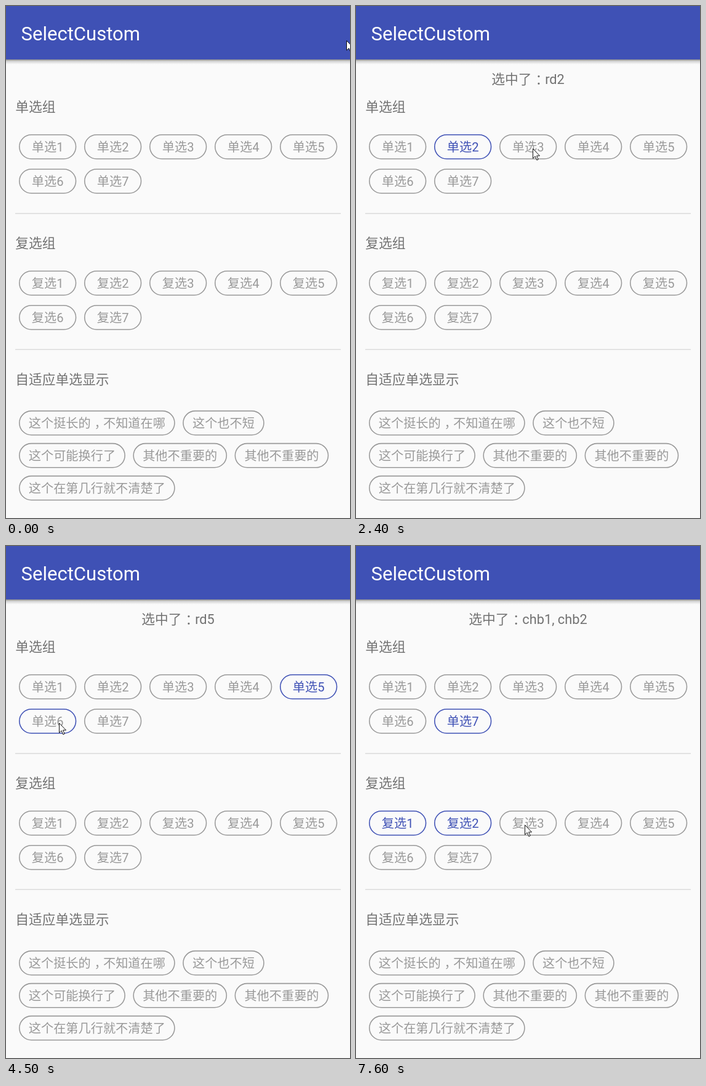
These frames come from a looping animation (559 by 834 pixels, 8000 ms). An HTML page:

```html
<!DOCTYPE html>
<html lang="zh-Hans">
<head>
<meta charset="utf-8">
<style>
  html, body { margin: 0; width: 100%; height: 100%; overflow: hidden; background: #fafafa; }
  svg { display: block; width: 559px; height: 834px; }
  text { font-family: Roboto, "Noto Sans CJK SC", sans-serif; fill: #727272; }
  .title { font-size: 31.07px; fill: #fff; }
  .heading { font-size: 21.75px; }
  .pill rect { fill: none; stroke: #999; stroke-width: 1.55; }
  .pill text { font-size: 20.2px; fill: #999; }
  .pill text, .status { text-anchor: middle; }
  .pressed rect, .selected rect { stroke: #3f51b5; }
  .selected text { fill: #3f51b5; }
</style>
</head>
<body>
<svg viewBox="0 0 559 834">
  <defs>
    <linearGradient id="shade" x2="0" y2="1">
      <stop offset="0" stop-color="#000" stop-opacity=".45"/>
      <stop offset=".35" stop-color="#000" stop-opacity=".16"/>
      <stop offset="1" stop-color="#000" stop-opacity="0"/>
    </linearGradient>
  </defs>
  <rect width="559" height="834" fill="#fafafa"/>
  <rect y="87" width="559" height="8" fill="url(#shade)"/>
  <rect width="559" height="87" fill="#3f51b5"/>
  <text class="title" x="24.5" y="56">SelectCustom</text>
  <text class="heading status" id="status" x="279.5" y="126.5"></text>
  <path d="M15 338H544M15 559.5H544" stroke="#dadada" stroke-width="1.5"/>
  <g id="content"></g>
  <path id="cursor" d="M.5.5V16.2L4.1 12.8 6.8 19 9.2 18 6.6 12H11.5Z" fill="#fff" stroke="#111"/>
</svg>
<script>
const LOOP = 8000, STEP = 100;
const HOLD = 200;      // time between press and selection
const MAX_MOVE = 600;  // longest cursor travel
const LEFT = 21.75, PILL_HEIGHT = 39.2;
const status = document.getElementById('status');
const content = document.getElementById('content');
const cursor = document.getElementById('cursor');

function add(tag, attrs, parent) {
  const el = document.createElementNS('http://www.w3.org/2000/svg', tag);
  for (const key in attrs) el.setAttribute(key, attrs[key]);
  return parent.appendChild(el);
}

// Moves full-width punctuation to the middle of its cell.
const markup = s => s.replace(/([，：])(.*)/,
  '<tspan dx=".28em">$1</tspan><tspan dx="-.28em">$2</tspan>');

function heading(label, y) {
  add('text', { class: 'heading', x: 15.3, y }, content).textContent = label;
}

function pill(label, x, y, width) {
  const group = add('g', { class: 'pill' }, content);
  add('rect', { x, y, width, height: PILL_HEIGHT, rx: PILL_HEIGHT / 2 }, group);
  add('text', { x: x + width / 2, y: y + 27.4 }, group).innerHTML = markup(label);
  return { group, y };
}

function grid(name, top) {
  return Array.from({ length: 7 }, (_, i) =>
    pill(name + (i + 1), LEFT + i % 5 * 106, top + Math.floor(i / 5) * 56, 91.8));
}

function flow(rows, top) {
  rows.forEach((row, i) => {
    let x = LEFT;
    for (const label of row) {
      const width = label.length * 20.2 + 30;
      pill(label, x, top + i * 53, width);
      x += width + 14;
    }
  });
}

function section(title, top) {
  heading(title + '组', top);
  return grid(title, top + 38.25);
}

const radios = section('单选', 171.5);
const checks = section('复选', 393.5);
heading('自适应单选显示', 615.5);
flow([
  ['这个挺长的，不知道在哪', '这个也不短'],
  ['这个可能换行了', '其他不重要的', '其他不重要的'],
  ['这个在第几行就不清楚了']
], 659.6);

// The cursor visits the pills in order: [x, arrival, press].
const pills = [...radios, ...checks];
const visits = [
  [81, 500, 800], [198, 1500, 1700], [287, 2400, 2600], [418, 3300, 3300],
  [469, 3600, 3900], [86, 4500, 4500], [174, 4900, 5000],
  [98, 6200, 6500], [178, 6700, 7200], [274, 7600, LOOP]
].map(([x, arrive, press], i) =>
  ({ x, y: pills[i].y + 22.5, arrive, press, select: press + HOLD }));

function cursorAt(t) {
  let x = 553, y = 56, free = 0;
  for (const v of visits) {
    const start = Math.max(free, v.arrive - MAX_MOVE);
    if (t < start) break;
    const k = Math.min(1, (t - start) / (v.arrive - start || 1));
    x += (v.x - x) * k;
    y += (v.y - y) * k;
    if (k < 1) break;
    free = Math.min(v.select, LOOP);
  }
  return [Math.round(x), Math.floor(y)];
}

function render(ms) {
  const t = Math.floor(ms % LOOP / STEP) * STEP;
  const done = visits.filter(v => t >= v.select).length;
  const radio = Math.min(done, radios.length) - 1;
  pills.forEach(({ group }, i) => {
    const selected = i === radio || i >= radios.length && i < done;
    const pressed = i === done && t >= visits[i].press;
    group.setAttribute('class', 'pill' + (selected ? ' selected' : pressed ? ' pressed' : ''));
  });
  const checked = Array.from({ length: Math.max(0, done - radios.length) }, (_, i) => 'chb' + (i + 1));
  const message = checked.join(', ') || 'rd' + done;
  status.innerHTML = done ? markup('选中了：' + message) : '';
  cursor.setAttribute('transform', `translate(${cursorAt(t)})`);
}

const start = performance.now();
function tick() {
  render(performance.now() - start);
  requestAnimationFrame(tick);
}
tick();
</script>
</body>
</html>
```
